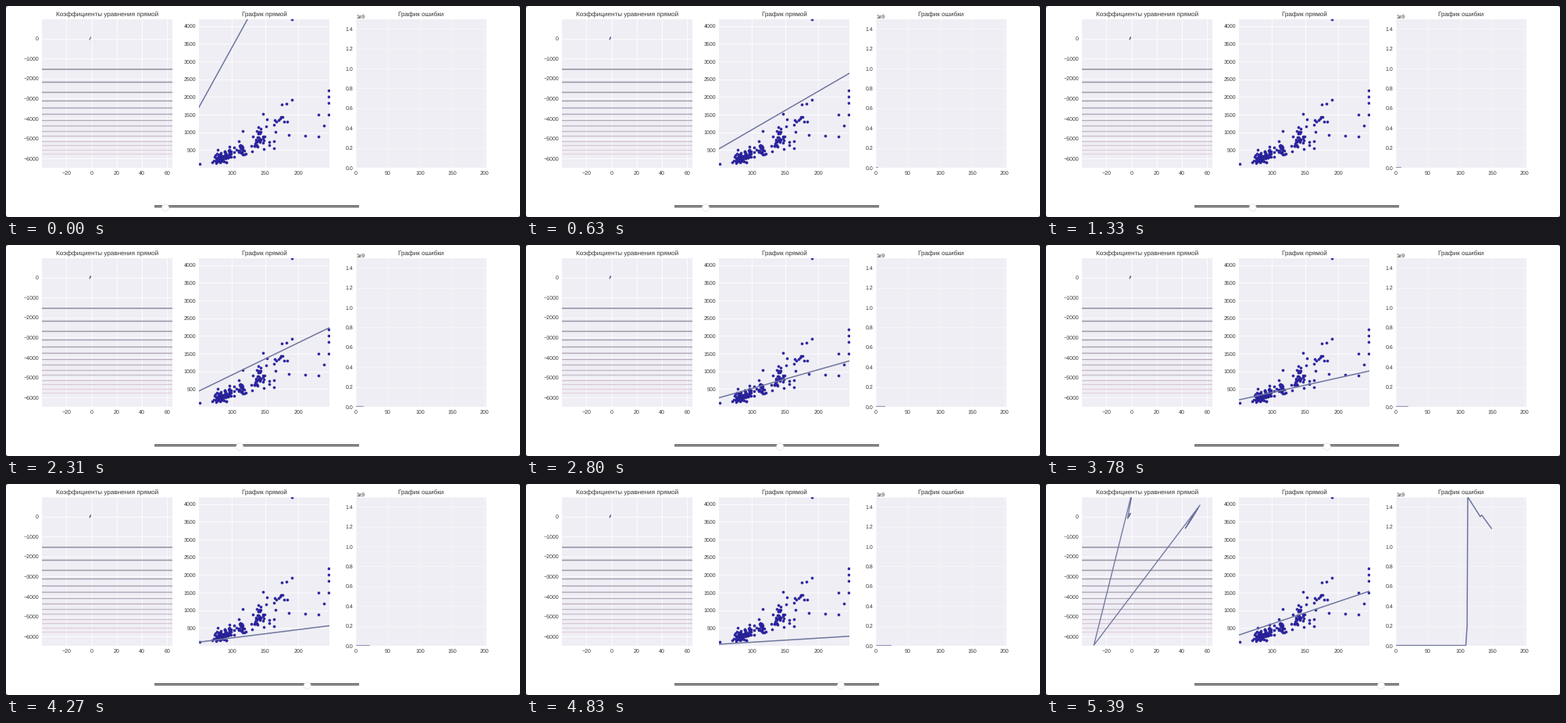
These frames come from a looping animation (658x270 px, 5.46 s). A matplotlib script:

```python
import numpy as np
import matplotlib.pyplot as plt
from matplotlib.animation import FuncAnimation
from matplotlib.patches import Circle, FancyBboxPatch, Rectangle

W, H = 658, 270
FRAMES, INTERVAL = 78, 70
INK, CURVE = "#333333", "#6d759d"

plt.rcParams.update({"font.family": "Liberation Sans", "text.color": INK,
                     "text.hinting": "none",
                     "xtick.color": INK, "ytick.color": INK})
fig = plt.figure(figsize=((W + 1e-6) / 72, (H + 1e-6) / 72), dpi=72,
                 facecolor="#555555")

# Window background and slider, in pixel coordinates from the top left.
stage = fig.add_axes([0, 0, 1, 1], zorder=-1)
stage.set(xlim=(0, W), ylim=(H, 0))
stage.axis("off")
stage.add_patch(FancyBboxPatch((0, 0), W, H, fc="white", ec="none",
                               boxstyle="round,pad=0,rounding_size=3"))
for y, tone in zip((255, 256, 257), ("#4c4c4c", "#a0a0a0", "#707070")):
    stage.add_patch(Rectangle((190, y), 262, 1, fc=tone, ec="none"))
handle = stage.add_patch(Circle((204, 258), 4.5, fc="white", ec="#dcdcdc",
                                lw=0.6, zorder=3))


def make_plot(left, title, xlim, ylim, xticks, yticks, grid_alpha=0.8):
    ax = fig.add_axes([left / W, 1 - 207 / H, 167 / W, 190 / H],
                      facecolor="#efeef5")
    ax.set(xlim=xlim, ylim=ylim, xticks=xticks, yticks=yticks)
    ax.set_title(title, fontsize=8.17, pad=3.8)
    ax.grid(color="white", lw=1, alpha=grid_alpha)
    ax.set_axisbelow(True)
    ax.tick_params(length=0, pad=4, labelsize=7)
    ax.spines[:].set_visible(False)
    return ax


weights = make_plot(46, "Коэффициенты уравнения прямой", (-39.5, 64.2),
                    (-6460, 960), range(-20, 61, 20), range(-6000, 1, 1000))
fit = make_plot(247, "График прямой", (50.6, 247), (0, 4190),
                (100, 150, 200), range(500, 4001, 500))
error = make_plot(448, "График ошибки", (0, 203.5), (0, 1.497),
                  range(0, 201, 50), np.arange(0, 1.5, 0.2), grid_alpha=0.4)
error.yaxis.set_major_formatter("{x:.1f}")
stage.text(448, 15.5, "1e9", fontsize=6.6)

# Level lines of a quadratic loss: spacing follows a square root.
near, far = np.array([0.57, 0.55, 0.62]), np.array([0.90, 0.82, 0.88])
for i in range(1, 15):
    mix = (i - 1) / 13
    weights.axhline(-1542 * np.sqrt(i), color=near + (far - near) * mix,
                    lw=1.5 - 0.3 * mix)


def scatter_points():
    """Quadratic trend with clumps in x, plus a thin tail and a few outliers."""
    rng = np.random.default_rng(11)
    clumps = rng.choice([81, 94, 113, 139], 145, p=[0.26, 0.34, 0.16, 0.24])
    x = np.round(np.r_[clumps + rng.normal(0, 5, clumps.size),
                       rng.uniform(146, 192, 24)])
    y = 0.039 * x**2 * rng.lognormal(0, 0.25, x.size)
    outliers = [(190, 4195), (190, 1910), (175, 1790), (245.5, 2190),
                (245.5, 2000), (245.5, 1840), (245.5, 1490), (231, 1510),
                (239, 1180), (231, 880), (211, 910), (52, 110)]
    return np.vstack([np.c_[x, y], outliers])


fit.scatter(*scatter_points().T, s=9, c="#3229ba", ec="#211b80", lw=0.6,
            zorder=2)

style = dict(color=CURVE, lw=1.5, solid_joinstyle="round", zorder=3)
path, = weights.plot([], [], **{**style, "lw": 1.3})
line, = fit.plot([], [], **style)
loss, = error.plot([], [], **style)


def zigzag(center, swing, ratio, turns):
    """Overshooting steps around a center that grow or shrink by a ratio."""
    factors = (-ratio) ** np.arange(turns)
    return np.array(center) + np.outer(factors, swing)


SETTLED = zigzag((-1.2, 0), (0.4, 55), 0.9, 3)
DIVERGED = np.vstack([zigzag((-2, 40), (0.5, 55), 1.2, 6),
                      [(1.5, 1500), (-30, -6430)],
                      zigzag((48, -60), (6.3, 630), 0.85, 9)])

SLOPE_KEYS = [(0, 34), (7, -20), (11, 9.1), (14, 5.3), (18, 4.15),
              (23, 1.15), (26, 6.3)]
LOSS_KEYS = [(0, 0.003), (109, 0.003), (111, 0.2), (112, 1.5),
             (131.5, 1.302), (133.8, 1.318), (149, 1.183)]


def iterations(step):
    return step if step < 24 else 50 * (step - 23)


def draw(frame):
    step = (frame + 2) // 3
    count = iterations(step)
    handle.center = (204 + 8.654 * step, 258)

    track = DIVERGED if count > 110 else SETTLED[:min(step, 1) + 2]
    path.set_data(*track.T)

    x = np.array([50.6, 247])
    line.set_data(x, np.interp(step, *zip(*SLOPE_KEYS)) * x - 15)

    n = np.arange(0, min(count, 149) + 0.1, 0.5)
    loss.set_data(n, np.interp(n, *zip(*LOSS_KEYS)))
    return path, line, loss, handle


anim = FuncAnimation(fig, draw, frames=FRAMES, interval=INTERVAL,
                     repeat=True, repeat_delay=0)
plt.show()
```
